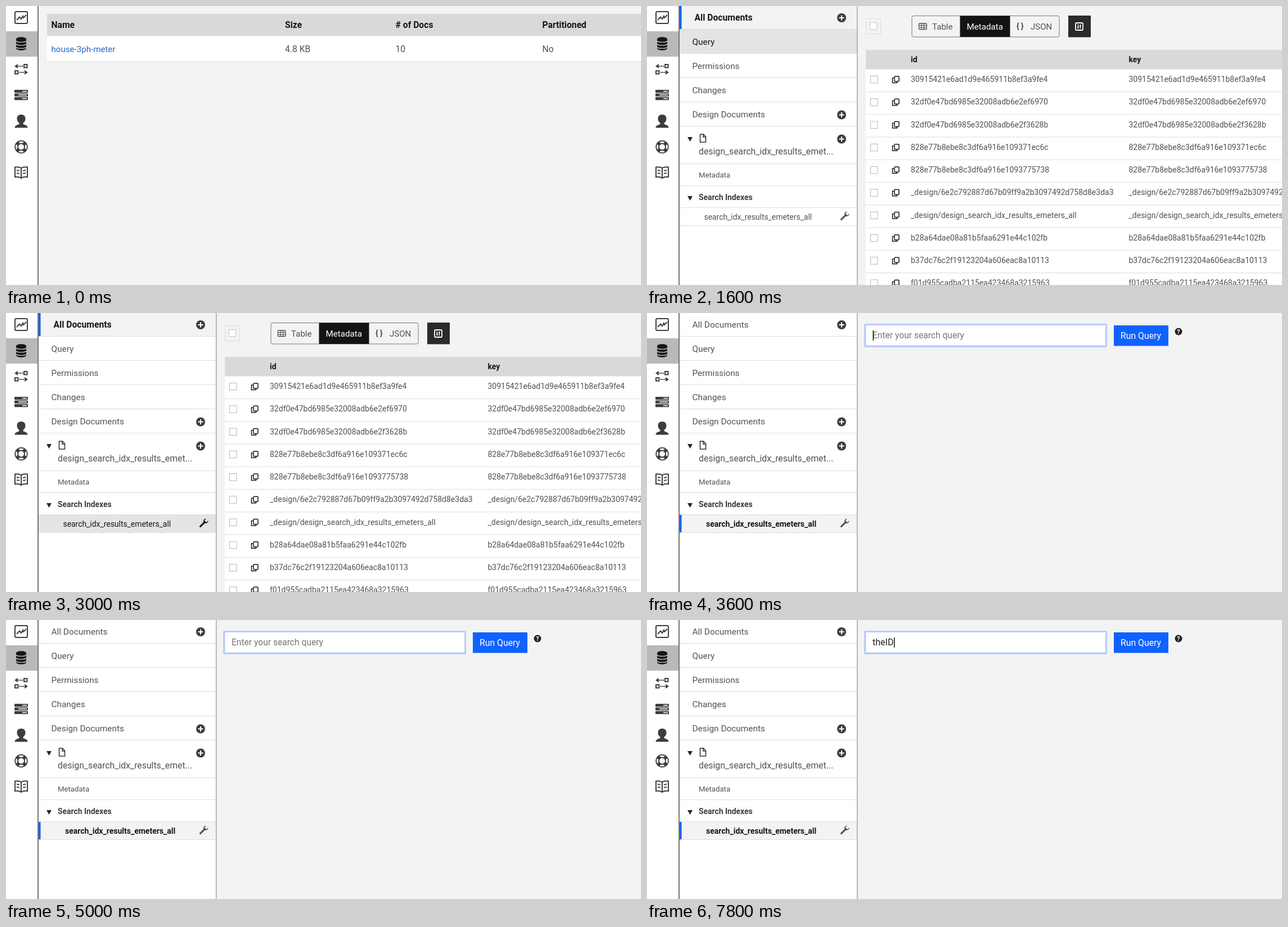
These frames come from a looping animation (1129 px wide and 496 px high, 8 s). An HTML page:

```html
<!DOCTYPE html>
<html lang="en">
<head>
<meta charset="utf-8">
<title>Database dashboard</title>
<style>
  html, body { margin: 0; width: 100%; height: 100%; overflow: hidden; background: #f3f3f3; }
  svg { display: block; width: 100%; height: 100%; }
  text { font-family: Roboto, "Noto Sans", sans-serif; white-space: pre; }
</style>
</head>
<body>
<svg id="stage" viewBox="0 0 1129 496"></svg>
<script>
const INK = '#161616', DARK = '#3d3d3d', GREY = '#525252', LINE = '#dedede', BLUE = '#0f62fe', PAGE = '#f3f3f3';
const INDEX = 'search_idx_results_emeters_all';
const IDS = [
  '30915421e6ad1d9e465911b8ef3a9fe4',
  '32df0e47bd6985e32008adb6e2ef6970',
  '32df0e47bd6985e32008adb6e2f3628b',
  '828e77b8ebe8c3df6a916e109371ec6c',
  '828e77b8ebe8c3df6a916e1093775738',
  '_design/6e2c792887d67b09ff9a2b3097492d758d8e3da3',
  '_design/design_' + INDEX,
  'b28a64dae08a81b5faa6291e44c102fb',
  'b37dc76c2f19123204a606eac8a10113',
  'f01d955cadba2115ea423468a3215963'
];

const rect = (x, y, w, h, fill, more = '') =>
  `<rect x="${x}" y="${y}" width="${w}" height="${h}" fill="${fill}" ${more}/>`;
const box = (x, y, w, h, color, fill = 'none', width = 1, more = '') =>
  rect(x, y, w, h, fill, `stroke="${color}" stroke-width="${width}" ${more}`);
const text = (x, y, str, size, fill = GREY, weight = 400) =>
  `<text x="${x}" y="${y}" font-size="${size}" fill="${fill}" font-weight="${weight}">${str}</text>`;
const fillPath = (d, color = DARK) => `<path d="${d}" fill="${color}"/>`;
const line = (d, color = DARK, width = 2, more = '') =>
  `<path d="${d}" fill="none" stroke="${color}" stroke-width="${width}" ${more}/>`;
const circle = (x, y, r, fill, more = '') => `<circle cx="${x}" cy="${y}" r="${r}" fill="${fill}" ${more}/>`;
const rule = y => rect(58, y, 315, 1, LINE);
const plus = y => circle(346, y, 8, DARK) + line(`M341.5 ${y}h9M346 ${y - 4.5}v9`, '#fff');
const triangle = y => fillPath(`M72 ${y}h9l-4.5 8z`, '#262626');

function navBar() {
  const disks = [61, 66.5, 72].map(y =>
    line(`M17 ${y}c1 4.5 19 4.5 20 0`, '#b9b9b9', 1.4)).join('');
  const servers = [149, 155.5, 162].map((y, i) =>
    rect(15, y, 24, 5.2, DARK, 'rx="1"') + rect([29, 22, 29][i], y + 1.8, [8, 15, 8][i], 1.6, '#fff')).join('');
  const spokes = [45, 135, 225, 315].map(a =>
    rect(33, 247.5, 5, 6, DARK, `transform="rotate(${a} 27 250.5)"`)).join('');
  return rect(0, 0, 56, 496, '#fff') + rect(0, 45, 56, 45, '#b9b9b9') + rect(56, 0, 2, 496, '#777') +
    box(16, 10, 22, 21, DARK, 'none', 2, 'rx="2"') + line('M19 25l5-5.5 3 3.5 3-5 1 3 5-5') +
    fillPath('M18 59c0-5 18-5 18 0v16c0 5-18 5-18 0z', INK) + disks +
    fillPath('M15 107l6-4v8zM39 118l-6-4v8z') +
    line('M22 107h8M24 118h8', DARK, 2, 'stroke-dasharray="2 1"') +
    box(32, 104, 5.5, 5.5, DARK, 'none', 2) + box(16, 115.2, 5.5, 5.5, DARK, 'none', 2) +
    servers +
    fillPath('M27 193c5 0 7.5 3 7.5 7 0 4-1.5 6-4 8v2c3 1.500 8 2 8 6.500h-23c0-4.500 5-5 8-6.500v-2c-2.500-2-4-4-4-8 0-4 2.500-7 7.500-7z') +
    spokes + circle(27, 250.5, 10.8, 'none', `stroke="${DARK}" stroke-width="1.8"`) +
    circle(27, 250.5, 6, '#fff', `stroke="${DARK}" stroke-width="2"`) +
    line('M27 288c-3-2-7-2-11-1.500v17.500c4-.5 8 0 11 2 3-2 7-2.500 11-2v-17.500c-4-.5-8-.5-11 1.500zv18') +
    line('M19 292l5 .8M19 297l5 .8M30 292.800l5-.8M30 297.800l5-.8', DARK, 1.8);
}

function databases(underlined) {
  const row = (y, cells, color, weight) =>
    [80.5, 496, 692.5, 953.5].map((x, i) => text(x, y, cells[i], 15.7, color, weight)).join('');
  return rect(73, 14, 1056, 39.5, '#d9d9d9') + rect(73, 53.5, 1056, 45, '#fff') + rect(73, 98.5, 1056, 1, LINE) +
    row(39, ['Name', 'Size', '# of Docs', 'Partitioned'], INK, 700) +
    row(82, ['', '4.8 KB', '10', 'No'], GREY, 400) +
    text(80.5, 82, 'house-3ph-meter', 15.1, underlined ? '#0043ce' : '#2766c9') +
    (underlined ? rect(80.5, 84, 113, 1, '#0043ce') : '');
}

const panel = () => rect(58, 0, 315, 496, '#fff') + rect(373, 0, 1.5, 496, '#a3a3a3');

const loader = (x, y, step) => [0, 1, 2, 3].map(i =>
  rect(x + i * 12.5, y, 9.5, i === step ? 4 : 1, '#bdbdbd')).join('');

// Menu rows that react to the pointer: [top, height]
const ROWS = { query: [42, 42], permissions: [85, 42], metadata: [281, 38], index: [359, 31] };

function menu(hover, active) {
  const onIndex = active === 'index';
  const [top, height] = onIndex ? ROWS.index : [0, 41];
  const lit = name => hover === name ? INK : GREY;
  const wrench = `<g transform="translate(351 374) rotate(45)">` +
    fillPath('M-1.500 9v-11c-3-1.500-3.500-5.500-1-7.500v4.500h5v-4.500c2.500 2 2 6-1 7.500v11z', lit('index')) + '</g>';
  return panel() +
    (hover ? rect(58, ROWS[hover][0], 315, ROWS[hover][1], '#e4e4e4') : '') +
    rect(58, top, 315, height, PAGE) + rect(57, top, 4.5, height, BLUE) +
    [41, 84, 127, 170, 213, 280, 319, 358, 390].map(rule).join('') +
    (onIndex ? text(80.5, 26, 'All Documents', 15.4) : text(84.5, 26, 'All Documents', 15.7, INK, 700)) +
    text(80.5, 69, 'Query', 15.4, lit('query')) +
    text(80.5, 112, 'Permissions', 15.2, lit('permissions')) +
    text(80.5, 155, 'Changes', 15.4) +
    text(80.5, 198, 'Design Documents', 15.4) +
    [21, 193.5, 236.5].map(plus).join('') +
    triangle(233) + triangle(338) +
    line('M94.500 228h6l4 4.500v9.500h-10zM100 228v5h4.500', '#333', 1.6) +
    text(92, 264, 'design_search_idx_results_emet...', 15.8) +
    text(92, 305, 'Metadata', 13.2, lit('metadata')) +
    text(92, 345, 'Search Indexes', 13.9, DARK, 700) +
    (onIndex ? text(105, 380, INDEX, 14, INK, 700) : text(101.5, 380, INDEX, 13.9, lit('index'))) +
    wrench;
}

function toolbar() {
  return box(389.5, 22.5, 26, 27, '#dcdcdc') + box(396.5, 29.5, 12.5, 12.5, '#c4c4c4', '#fff') +
    box(471, 17.5, 262, 37.5, '#777', PAGE, 1, 'rx="3"') + rect(556.5, 17.5, 89, 37.5, '#131313') +
    box(483.5, 31, 13.5, 10.5, GREY, 'none', 1.4, 'rx="1"') +
    line('M483.500 34.500h13.500M483.500 38h13.500M488 31v10.500M492.500 31v10.500', GREY, 1.2) +
    text(507, 41.5, 'Table', 15.1) + text(568.5, 42, 'Metadata', 15.2, '#fff') +
    text(657, 41, '{ }', 14, DARK, 700) + text(682, 41.5, 'JSON', 15) +
    rect(749, 17, 40, 38.5, '#2b2b2b') + box(762, 30, 13, 13, '#fff', 'none', 1.8, 'rx="2"') +
    line('M766.500 32.500v8M770.500 32.500v8', '#fff', 1.4) + line('M765 38h3M769 35h3', '#fff', 1.6);
}

function documents() {
  const rows = IDS.map((id, i) => {
    const y = 130.5 + i * 40.25;
    return rect(389, y + 21.5, 740, 1, LINE) +
      box(397.5, y - 6, 12.5, 12.5, '#b5b5b5', '#fff') +
      box(440, y - 5.5, 8, 9, INK, 'none', 1.5, 'rx="1"') + line(`M439 ${y - 2.5}h-2.500v8.500h8v-2`, INK, 1.5) +
      text(469, y + 4.5, id, 14) + text(856.5, y + 4.5, id, 14);
  }).join('');
  return rect(389, 112, 740, 384, '#fff') + rect(389, 78, 740, 34.5, '#d9d9d9') +
    text(469, 100, 'id', 14, INK, 700) + text(856.5, 100, 'key', 14, INK, 700) + rows;
}

function search(typed, caret) {
  const caretX = 402 + [0, 5.3, 14.1, 22.5, 26.9, 37.5][typed.length];
  return rect(386, 19, 432, 42, '#b7cdf8', 'rx="2"') + rect(389.5, 22, 425.5, 35.5, '#fff') +
    (typed ? text(401, 45, typed, 16, '#222') : text(401, 45, 'Enter your search query', 15.6, '#777')) +
    (caret ? rect(caretX - 0.5, 31, 1.5, 18, '#111') : '') +
    rect(830, 22, 97, 36.5, BLUE) + text(842, 46, 'Run Query', 15.8, '#fff') +
    circle(945, 33, 6.5, '#222') + text(942.2, 37, '?', 11, '#fff', 700);
}

const nav = navBar(), bar = toolbar(), docs = documents();
const loading = step => panel() + loader(175, 18, step) + loader(1002, 77, step) + bar;
const listing = hover => menu(hover, 'all') + bar + docs;
const query = (typed, caret = true) => menu(null, 'index') + search(typed, caret);

const SCENES = [
  [0, () => databases(false)],
  [200, () => databases(true)],
  [1200, () => loading(0)],
  [1400, () => loading(1)],
  [1600, () => listing('query')],
  [2600, () => listing('permissions')],
  [2800, () => listing('metadata')],
  [3000, () => listing('index')],
  [3600, () => query('')],
  [4200, () => query('', false)],
  [4600, () => query('')],
  [5000, () => query('', false)],
  [5400, () => query('t')],
  [5600, () => query('th')],
  [6000, () => query('the')],
  [6600, () => query('the', false)],
  [7000, () => query('the')],
  [7200, () => query('theI')],
  [7800, () => query('theID')]
];

const stage = document.getElementById('stage');
const start = performance.now();
let shown;

function tick() {
  const t = (performance.now() - start) % 8000;
  const scene = SCENES.findLast(([from]) => from <= t);
  if (scene !== shown) {
    shown = scene;
    stage.innerHTML = rect(0, 0, 1129, 496, PAGE) + scene[1]() + nav;
  }
  requestAnimationFrame(tick);
}
tick();
</script>
</body>
</html>
```
